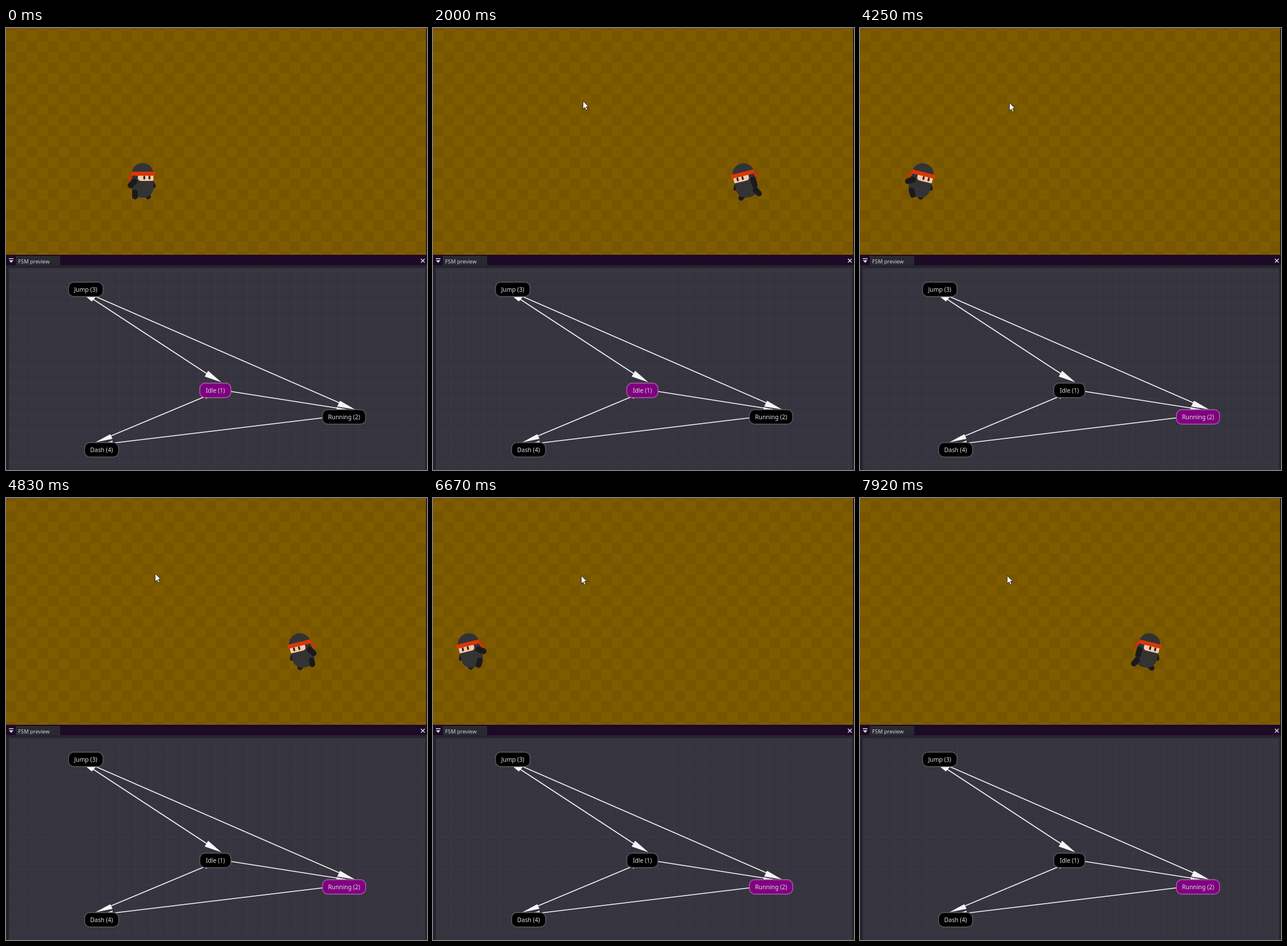
Recreate the animation shown at these times as an HTML page with a canvas. Size 731 by 766 pixels, loop 8000 ms.

```html
<!DOCTYPE html>
<html lang="en">
<head>
<meta charset="utf-8">
<title>FSM preview</title>
<style>
html, body { margin: 0; width: 100%; height: 100%; overflow: hidden; background: #1b1a22; }
canvas { display: block; width: 731px; height: 766px; }
</style>
</head>
<body>
<canvas id="stage" width="731" height="766"></canvas>
<script>
const W = 731, H = 766, LOOP = 8000, STEP = 1000 / 12;
const ctx = document.getElementById('stage').getContext('2d');

const NODES = {
  Jump: [108, 440, 61, 'Jump (3)'],
  Idle: [336, 615, 55, 'Idle (1)'],
  Run: [549, 661, 76, 'Running (2)'],
  Dash: [136, 718, 60, 'Dash (4)']
};

// start time, state, time at which the near leg is fully forward
const STATES = [
  [0, 'Idle'], [950, 'Run', 1775], [1985, 'Idle'], [2310, 'Run', 2310],
  [2930, 'Jump'], [3490, 'Run', 4250], [4350, 'Dash'], [4600, 'Run', 5387],
  [6050, 'Dash'], [6300, 'Run', 6670], [6900, 'Dash'], [7150, 'Run', 7695]
];

// time, x
const PATH = [
  [0, 237], [950, 237], [1735, 630], [1911, 542], [2310, 542], [2487, 630],
  [2510, 630], [3168, 298], [3480, 143], [3770, 288], [4190, 76], [4350, 156],
  [4600, 480], [4750, 555], [5138, 361], [5496, 540], [5752, 668], [5850, 668],
  [6050, 568], [6300, 250], [6660, 65], [6690, 65], [6900, 169], [7150, 510],
  [7466, 668], [7510, 668], [7870, 478], [7920, 501], [8000, 541]
];

const CURSOR = [
  [500, 300, -18], [800, 270, 70], [1000, 261, 109], [1200, 260, 126], [2000, 260, 126],
  [3170, 260, 127], [4250, 259, 129], [5500, 258, 132], [6670, 257, 134], [8000, 255, 134]
];

const rad = d => d * Math.PI / 180;

function segment(keys, t) {
  let i = 0;
  while (i < keys.length - 2 && keys[i + 1][0] <= t) i++;
  return i;
}

function sample(keys, t, k = 1) {
  const i = segment(keys, t), a = keys[i], b = keys[i + 1];
  return a[k] + (b[k] - a[k]) * (t - a[0]) / (b[0] - a[0]);
}

function facing(t) {
  for (let i = segment(PATH, t); i >= 0; i--) {
    const d = PATH[i + 1][1] - PATH[i][1];
    if (d) return Math.sign(d);
  }
  return 1;
}

function stateAt(t) {
  let s = STATES[0];
  for (const k of STATES) if (k[0] <= t) s = k;
  return s;
}

function rect(g, color, x, y, w, h) {
  g.fillStyle = color;
  g.fillRect(x, y, w, h);
}

function poly(g, color, ...p) {
  g.beginPath();
  for (let i = 0; i < p.length; i += 2) g.lineTo(p[i], p[i + 1]);
  g.closePath();
  g.fillStyle = color;
  g.fill();
}

function line(g, color, width, x1, y1, x2, y2) {
  g.strokeStyle = color;
  g.lineWidth = width;
  g.beginPath();
  g.moveTo(x1, y1);
  g.lineTo(x2, y2);
  g.stroke();
}

function box(g, color, x, y, w, h, r) {
  g.beginPath();
  g.roundRect(x, y, w, h, r);
  g.fillStyle = color;
  g.fill();
}

function drawFloor(g) {
  const size = 18.25;
  rect(g, '#805c00', 0, 0, W, 393);
  for (let j = -1; j < 22; j++)
    for (let i = 0; i < 41; i++)
      if ((i + j) & 1) rect(g, '#785600', i * size, 5 + j * size, size, size);
  rect(g, '#7c4f22', 0, 0, W, 1.5);
  rect(g, '#17101a', 729.5, 0, 2, 393);
}

function drawPanel(g) {
  rect(g, '#1c0a27', 0, 393, W, 19);
  rect(g, '#2a2932', 17, 395, 77, 17);
  rect(g, '#25242c', 0, 411, W, 355);
  rect(g, '#36353f', 5, 416, 723, 350);
  for (let x = 31.5; x < 728; x += 27.65) line(g, '#3d3c46', 1, x, 416, x, H);
  for (let y = 421.3; y < H; y += 27.65) line(g, '#3d3c46', 1, 5, y, 728, y);

  rect(g, '#dedee2', 5, 399, 8, 1.4);
  poly(g, '#dedee2', 5, 402.5, 13, 402.5, 9, 407);
  line(g, '#dedee2', 1.5, 720.5, 400, 727, 406.5);
  line(g, '#dedee2', 1.5, 727, 400, 720.5, 406.5);
  g.fillStyle = '#d4d4d8';
  g.font = '9.3px "Noto Sans", sans-serif';
  g.fillText('FSM preview', 21, 407.5);
}

function drawLinks(g) {
  const white = '#f6f6f8';
  line(g, white, 1.5, 142, 464, 364, 609);
  line(g, white, 1.5, 150, 463, 596, 657);
  line(g, white, 1.5, 385, 629, 590, 661);
  line(g, white, 1.5, 555, 675, 180, 720);
  line(g, white, 1.5, 352, 636, 170, 712);
  poly(g, white, 374, 614, 345, 604, 351, 594);
  poly(g, white, 136, 463, 156, 466, 149, 474);
  poly(g, white, 606, 661, 575, 656, 580, 646);
  poly(g, white, 574, 657, 596, 663, 574, 662);
  poly(g, white, 155, 718, 181, 704, 185, 712);
  poly(g, white, 168, 721, 185, 715, 185, 721);
  poly(g, white, 343, 636, 352, 636, 348, 643);
}

function drawNode([x, y, w, label], active) {
  box(ctx, active ? '#800080' : '#000', x + .5, y + .5, w - 1, 25, 9);
  ctx.strokeStyle = active ? '#a95fae' : '#5c5b61';
  ctx.lineWidth = 1.4;
  ctx.stroke();
  ctx.fillStyle = '#dedee0';
  ctx.font = '10.3px "Noto Sans", sans-serif';
  ctx.textAlign = 'center';
  ctx.fillText(label, x + w / 2, y + 17);
  ctx.textAlign = 'left';
}

function limb(x1, y1, x2, y2, width = 10) {
  ctx.lineCap = 'round';
  line(ctx, '#1b1a1b', width, x1, y1, x2, y2);
  ctx.lineCap = 'butt';
}

// pose: lean and arm in degrees, leg swing -1..1, lift in pixels
function drawNinja(x, dir, { lean = 0, arm = 45, leg = 0, lift = 0, tuck = false }) {
  ctx.save();
  ctx.translate(x, 265 - lift);
  ctx.scale(dir, 1);
  ctx.rotate(rad(lean));
  ctx.translate(0, 32);

  limb(17, -28, 19.5, -23, 7);
  if (tuck) limb(14, -12, 16, -11, 9);
  else limb(8, -9, 10 - 4 * leg, -5, 9.5);

  box(ctx, '#333334', -19, -63, 38, 60, [19, 19, 17, 17]);
  poly(ctx, '#c9330a', -17, -47, -26, -36, -24, -31, -18, -37);
  box(ctx, '#f8c8a4', -8, -43, 27, 11, [3, 1, 2, 5]);
  if (tuck) {
    rect(ctx, '#2a2424', 1, -37, 5, 1.8);
    rect(ctx, '#2a2424', 10, -37, 5, 1.8);
  } else {
    box(ctx, '#241f20', 1.5, -41, 3.2, 6.5, 1.5);
    box(ctx, '#241f20', 10.5, -41, 3.2, 6.5, 1.5);
  }
  rect(ctx, '#d93708', -19, -48, 41, 7);

  if (tuck) limb(-11, -9, -5, -9);
  else limb(-13 + leg, -12, -13 + 5 * leg, -5);
  const a = rad(arm);
  limb(-14, -31, -14 - 9.5 * Math.sin(a), -31 + 9.5 * Math.cos(a));
  ctx.restore();
}

function poseAt(t) {
  const [start, name, ref] = stateAt(t - 30);
  if (name === 'Jump') {
    const p = Math.min(1, (t - 2930) / 560);
    return { lean: 360 * p, lift: 228 * p * (1 - p), arm: 15, tuck: true };
  }
  if (name === 'Dash') return { lean: 18, arm: 60, leg: -1 };
  if (name === 'Idle') return {};
  const leg = Math.cos((t - ref) / 450 * Math.PI * 2);
  return { lean: 14, arm: 30 + 28 * leg, leg };
}

function drawCursor(t) {
  if (t < CURSOR[0][0]) return;
  ctx.save();
  ctx.translate(sample(CURSOR, t, 1), sample(CURSOR, t, 2));
  poly(ctx, '#fff', .5, .5, .5, 14.5, 3.7, 11.5, 6, 16.5, 8.2, 15.5, 6, 10.5, 10, 10.5);
  ctx.strokeStyle = '#222';
  ctx.lineWidth = .9;
  ctx.stroke();
  ctx.restore();
}

const back = document.createElement('canvas');
back.width = W;
back.height = H;
const bg = back.getContext('2d');
drawFloor(bg);
drawPanel(bg);
drawLinks(bg);

function draw(t) {
  ctx.drawImage(back, 0, 0);
  const active = stateAt(t)[1];
  for (const name in NODES) drawNode(NODES[name], name === active);
  drawNinja(sample(PATH, t), facing(t), poseAt(t));
  drawCursor(t);
}

let first;
function tick(now) {
  first ??= now;
  const t = (now - first) % LOOP;
  draw(Math.floor((t + 5) / STEP) * STEP % LOOP);
  requestAnimationFrame(tick);
}
draw(0);
requestAnimationFrame(tick);
</script>
</body>
</html>
```
